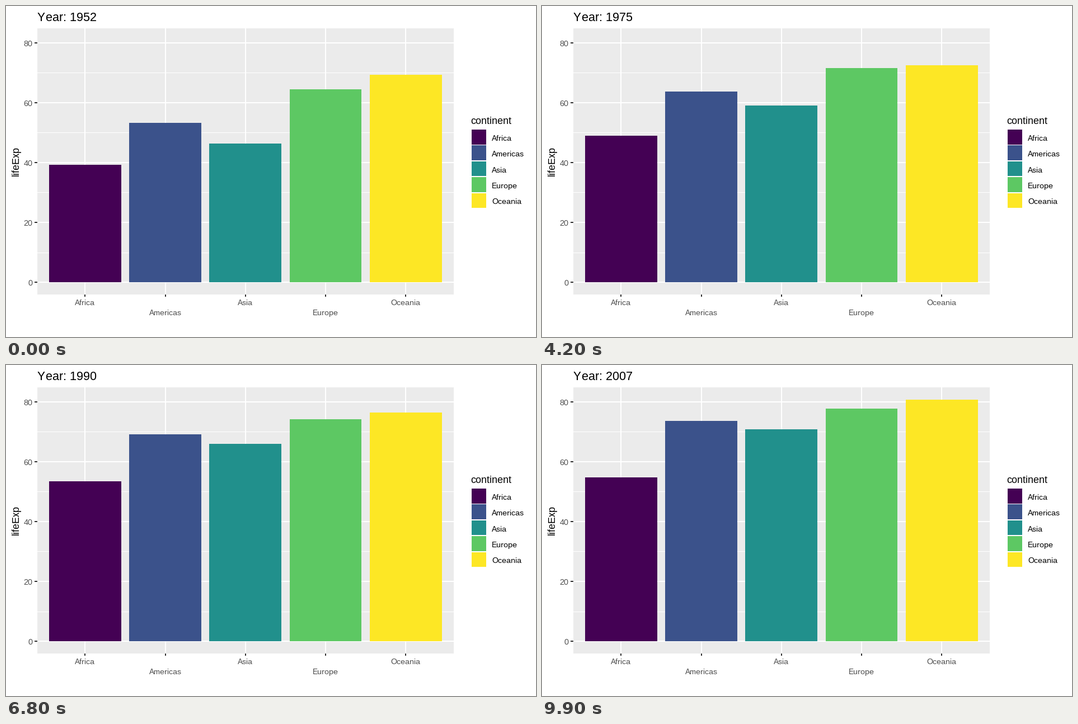
Recreate the animation shown at these times as a matplotlib script. Size 947 by 592 pixels, loop 10000 ms.

```python
from math import floor

import numpy as np
import matplotlib.pyplot as plt
from matplotlib.animation import FuncAnimation
from matplotlib.patches import Rectangle

W, H, DPI = 947, 592, 64
FRAMES, INTERVAL = 100, 100

LEFT, RIGHT, TOP, BOTTOM = 56.04, 800.6, 40.6, 516.3
UNIT = (RIGHT - LEFT) / 5.2
ZERO, SCALE = 494.65, 5.357
KEY = 28.35

FIRST, SPAN = 1952, 55
# Each mean is a smooth curve through a few key years
KEY_TIMES = np.array([0, 5, 20, 35, 50, 55]) / SPAN
CONTINENTS = {
    "Africa": ("#440154", [39.14, 41.35, 47.45, 53.1, 53.33, 54.81]),
    "Americas": ("#3B528B", [53.28, 55.96, 62.4, 68.1, 72.42, 73.61]),
    "Asia": ("#21908C", [46.31, 49.1, 57.15, 64.85, 69.23, 70.73]),
    "Europe": ("#5DC863", [64.41, 66.7, 70.8, 73.65, 76.65, 77.65]),
    "Oceania": ("#FDE725", [69.26, 70.3, 71.91, 75.45, 79.7, 80.72]),
}

plt.rcParams.update({"font.family": "Liberation Sans",
                     "text.hinting": "native", "text.hinting_factor": 1})
fig = plt.figure(figsize=(W / DPI, H / DPI), dpi=DPI, facecolor="white")
ax = fig.add_axes([0, 0, 1, 1])
ax.set_xlim(0, W)
ax.set_ylim(H, 0)
ax.axis("off")


def box(x0, y0, x1, y1, color):
    """Filled rectangle on whole pixels."""
    x0, y0, x1, y1 = map(floor, (x0, y0, x1, y1))
    return ax.add_patch(Rectangle((x0, y0), x1 - x0, y1 - y0, fc=color,
                                  lw=0, antialiased=False))


def label(x, y, s, size, color="black", ha="left", **kw):
    return ax.text(x, y, s, fontsize=size * 72 / DPI, color=color, ha=ha,
                   va="baseline", **kw)


def y_px(value):
    return floor(ZERO - SCALE * value)


box(LEFT, TOP, RIGHT, BOTTOM, "#EBEBEB")
for v in range(10, 80, 20):
    y = y_px(v)
    box(LEFT, y, RIGHT, y + 1, "white")
for v in range(0, 81, 20):
    y = y_px(v)
    box(LEFT, y - 1, RIGHT, y + 1, "white")
    box(LEFT - 5, y - 1, LEFT, y + 1, "#333333")
    label(47.7, y + 6, str(v), 14, "#4D4D4D", "right")

bars, curves = [], []
for i, (name, (color, means)) in enumerate(CONTINENTS.items()):
    x = LEFT + UNIT * (i + 0.6)
    mid = floor(x)
    box(mid - 1, TOP, mid + 1, BOTTOM, "white")
    box(mid - 1, BOTTOM, mid + 1, BOTTOM + 4, "#333333")
    bars.append(box(x - 0.45 * UNIT, y_px(means[0]), x + 0.45 * UNIT, ZERO, color))
    curves.append(np.polyfit(KEY_TIMES, means, len(KEY_TIMES) - 1))
    label(x - 0.5, 535 + 18 * (i % 2), name, 14, "#4D4D4D", "center")

    top = 221.6 + KEY * i
    box(832, top, 858, top + 26.6, color)
    label(868, 241 + KEY * i, name, 14)

label(830.3, 211, "continent", 18)
label(23, 278, "lifeExp", 18, ha="center", rotation=90, rotation_mode="anchor")
# Drawn in two parts so that "Ye" is not kerned
label(56, 27, "Y", 22)
title = label(71, 27, "", 22)


def update(frame):
    t = frame / (FRAMES - 1)
    title.set_text(f"ear: {FIRST + SPAN * t:.0f}")
    for bar, curve in zip(bars, curves):
        top = y_px(np.polyval(curve, t))
        bar.set_y(top)
        bar.set_height(floor(ZERO) - top)
    return [title, *bars]


anim = FuncAnimation(fig, update, frames=FRAMES, interval=INTERVAL, repeat=True)
plt.show()
```
